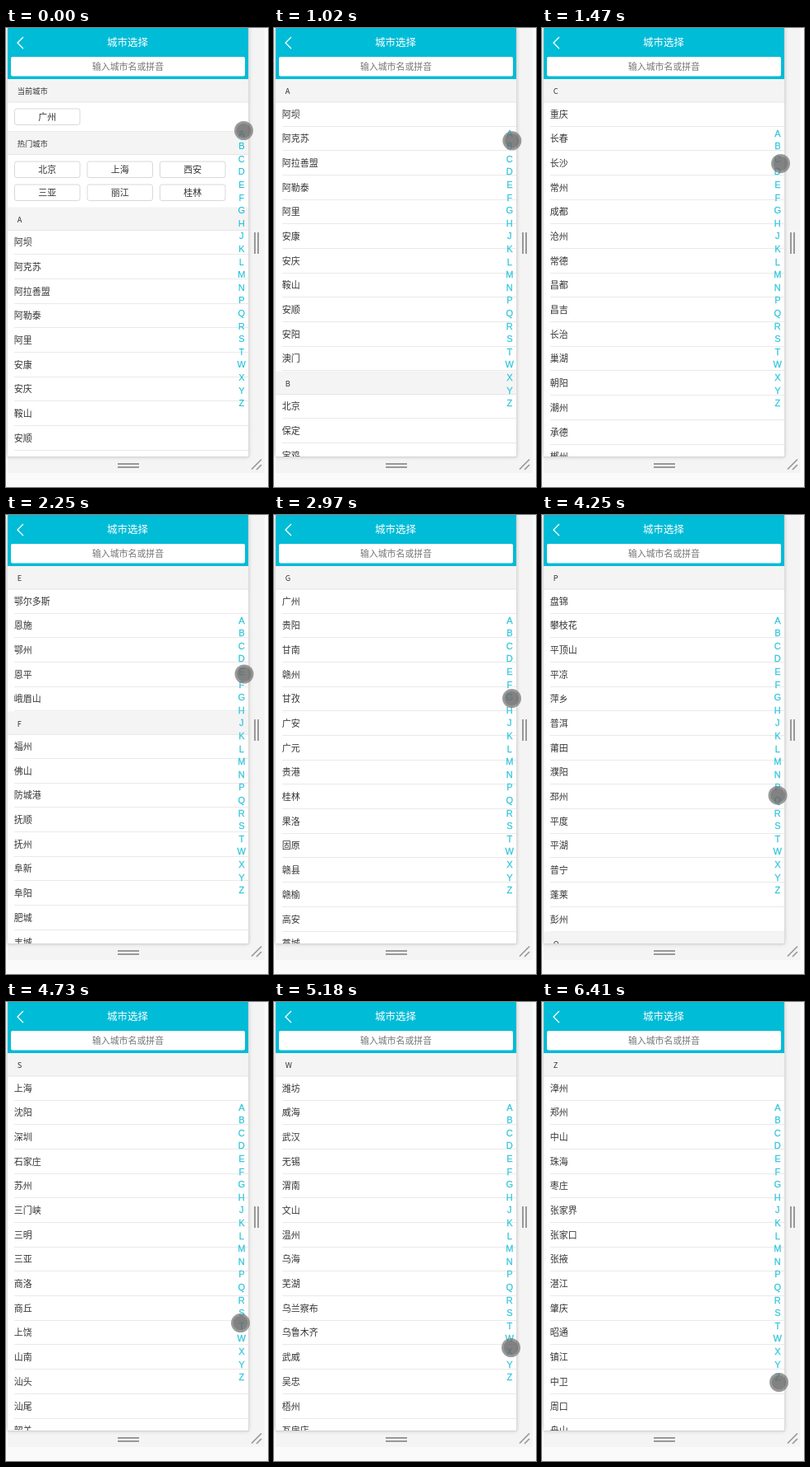
These frames come from a looping animation (319 by 557 pixels, 6730 ms). An HTML page with a canvas:

```html
<!DOCTYPE html>
<html lang="zh-CN">
<head>
<meta charset="utf-8">
<style>
html, body { margin: 0; width: 100%; height: 100%; overflow: hidden; background: #fafafa; }
canvas { display: block; width: 319px; height: 557px; }
</style>
</head>
<body>
<canvas id="stage"></canvas>
<script>
const W = 319, H = 557, LOOP = 6730;
const TEAL = '#00bcd7';
const CJK = '"Noto Sans CJK SC", "Noto Sans CJK", sans-serif';
const LATIN = '"Liberation Sans", Arial, sans-serif';
const LETTERS = [...'ABCDEFGHJKLMNPQRSTWXYZ'];
const TOP = 62, BOTTOM = 520, HEAD_H = 28, ROW_H = 29.68;
const TOUCH_STEP = 15.75;

const CITIES = `阿坝 阿克苏 阿拉善盟 阿勒泰 阿里 安康 安庆 鞍山 安顺 安阳 澳门
北京 保定 宝鸡 包头 蚌埠 白城 百色 白山 白银 保山 巴中 北海 本溪 毕节 滨州 亳州
重庆 长春 长沙 常州 成都 沧州 常德 昌都 昌吉 长治 巢湖 朝阳 潮州 承德 郴州 赤峰
大连 东莞 大理 丹东 大庆 大同 达州 德宏 德阳 德州 定西 迪庆 东营 大丰 大冶 丹阳
鄂尔多斯 恩施 鄂州 恩平 峨眉山
福州 佛山 防城港 抚顺 抚州 阜新 阜阳 肥城 丰城 凤城 奉化 福安 福鼎 福清 富阳
广州 贵阳 甘南 赣州 甘孜 广安 广元 贵港 桂林 果洛 固原 赣县 赣榆 高安 藁城 高密
杭州 哈尔滨 海口 合肥 呼和浩特 惠州 邯郸 汉中 鹤壁 河池 鹤岗 黑河 衡水 衡阳 河源 菏泽
济南 嘉兴 吉林 江门 金华 九江 济宁 佳木斯 吉安 焦作 嘉峪关 揭阳 金昌 晋城 荆门 荆州
昆明 开封 喀什 克拉玛依 克州 垦利 开平 开原 凯里 昆山 库尔勒
兰州 柳州 洛阳 来宾 莱芜 廊坊 拉萨 乐山 凉山 连云港 聊城 辽阳 辽源 丽江 临沧 临汾
绵阳 马鞍山 茂名 眉山 梅州 牡丹江 满洲里 孟州 汨罗 密山 明光
南京 南昌 南宁 南通 宁波 南充 南平 南阳 那曲 内江 宁德 怒江 南安 南康 南雄
盘锦 攀枝花 平顶山 平凉 萍乡 普洱 莆田 濮阳 邳州 平度 平湖 普宁 蓬莱 彭州
青岛 泉州 秦皇岛 黔东南 黔南 黔西南 庆阳 清远 钦州 齐齐哈尔 七台河 曲靖 衢州 迁安 潜江
日喀则 日照 仁怀 任丘 荣成 如东 如皋 乳山 汝州 瑞安 瑞昌 瑞金
上海 沈阳 深圳 石家庄 苏州 三门峡 三明 三亚 商洛 商丘 上饶 山南 汕头 汕尾 韶关 绍兴
天津 太原 泰安 唐山 台州 泰州 塔城 天水 铁岭 通化 通辽 铜川 铜陵 铜仁 吐鲁番 台山
潍坊 威海 武汉 无锡 渭南 文山 温州 乌海 芜湖 乌兰察布 乌鲁木齐 武威 吴忠 梧州 瓦房店 万宁
西安 厦门 徐州 西宁 襄阳 湘潭 湘西 咸宁 咸阳 孝感 锡林郭勒 兴安盟 邢台 新乡 信阳 新余
烟台 扬州 银川 宜昌 延安 盐城 阳江 阳泉 延边 宜宾 伊春 伊犁 营口 鹰潭 益阳 永州
漳州 郑州 中山 珠海 枣庄 张家界 张家口 张掖 湛江 肇庆 昭通 镇江 中卫 周口 舟山 驻马店`
  .split('\n').map(line => line.split(' '));

// [start, end, count]: evenly spaced picture updates
const BURSTS = [
  [0, 0, 1], [70, 70, 1], [860, 1470, 9], [1640, 2250, 9], [2350, 3020, 10],
  [3100, 3720, 9], [3790, 4400, 9], [4480, 5100, 9], [5180, 5790, 9],
  [5870, 5870, 1], [6020, 6180, 3], [6410, 6410, 1]
];

// [time, x, y] of the touch point
const TOUCH = [
  [0, 289.5, 124.5], [70, 289.5, 124], [800, 289.5, 124], [1470, 290.5, 164.5],
  [1640, 290.5, 166], [2250, 290, 193], [2945, 289.5, 222.5], [3020, 289.5, 228],
  [3790, 288.5, 291.5], [4712, 285.5, 389.5], [5180, 288.5, 419.5], [5790, 290.5, 445.5],
  [5870, 290.5, 447.5], [6020, 290, 450], [6180, 288.5, 457.5], [6410, 288.5, 461.5]
];

const canvas = document.getElementById('stage');
const ctx = canvas.getContext('2d');
const ratio = window.devicePixelRatio || 1;
canvas.width = W * ratio;
canvas.height = H * ratio;

function rect(x, y, w, h, color) {
  ctx.fillStyle = color;
  ctx.fillRect(x, y, w, h);
}

function roundBox(x, y, w, h, r, fill, stroke) {
  ctx.beginPath();
  ctx.roundRect(x, y, w, h, r);
  ctx.fillStyle = fill;
  ctx.fill();
  if (stroke) {
    ctx.strokeStyle = stroke;
    ctx.lineWidth = 1;
    ctx.stroke();
  }
}

function line(points, color, width) {
  ctx.beginPath();
  points.forEach(([x, y]) => ctx.lineTo(x, y));
  ctx.strokeStyle = color;
  ctx.lineWidth = width;
  ctx.stroke();
}

function text(str, x, y, size, color, align = 'left', family = CJK, weight = 400) {
  ctx.font = `${weight} ${size}px ${family}`;
  ctx.fillStyle = color;
  ctx.textAlign = align;
  ctx.textBaseline = 'alphabetic';
  ctx.fillText(str, x, y + size * 0.37);
}

function updateTime(t) {
  const [start, end, count] = BURSTS.findLast(b => t >= b[0]);
  if (count === 1) return start;
  const step = (end - start) / (count - 1);
  return start + Math.min(count - 1, Math.floor((t - start) / step + 1e-6)) * step;
}

function touchAt(t) {
  const i = TOUCH.findIndex(k => k[0] > t);
  if (i < 0) return TOUCH.at(-1).slice(1);
  const [t0, x0, y0] = TOUCH[i - 1], [t1, x1, y1] = TOUCH[i];
  const p = (t - t0) / (t1 - t0);
  return [x0 + (x1 - x0) * p, y0 + (y1 - y0) * p];
}

function sectionHead(title, y) {
  rect(2, y, 293, HEAD_H, '#f4f4f4');
  rect(2, y + HEAD_H - 0.5, 293, 1, '#e6e6e6');
  text(title, 13.7, y + 15, 9.3, '#333');
}

function cityButton(name, col, y) {
  const x = 10 + col * 88.5;
  roundBox(x + 0.5, y + 0.5, 79.5, 19.5, 2.5, '#fff', '#d8d8d8');
  text(name, x + 40.2, y + 10.2, 11, '#333', 'center');
}

function drawCities(first, y) {
  for (let s = first; s < CITIES.length && y < BOTTOM; s++) {
    sectionHead(LETTERS[s], y);
    y += HEAD_H;
    for (const city of CITIES[s]) {
      if (y > BOTTOM) return;
      text(city, 9.8, y + 14.6, 11, '#333');
      y += ROW_H;
      rect(10, Math.round(y) - 1, 285, 1, '#e9e9e9');
    }
  }
}

function drawTopSections() {
  sectionHead('当前城市', TOP);
  cityButton('广州', 0, 97.5);
  rect(2, 125, 293, 1, '#e6e6e6');
  sectionHead('热门城市', 125.5);
  ['北京', '上海', '西安', '三亚', '丽江', '桂林'].forEach((name, i) =>
    cityButton(name, i % 3, i < 3 ? 161.5 : 189.5));
  drawCities(0, 217.5);
}

function drawFrame() {
  rect(0, 0, W, H, '#fafafa');
  rect(0, 0, 315, 540, '#f4f4f4');
  rect(0, 0, 2, 540, '#fafafa');
  ctx.save();
  ctx.shadowColor = 'rgba(0,0,0,.25)';
  ctx.shadowBlur = 5 * ratio;
  rect(2, 0, 293, BOTTOM, '#fff');
  ctx.restore();

  const grip = '#999';
  for (const d of [0, 4]) {
    rect(302 + d, 248, 2, 26, grip);
    rect(136, 528 + d, 26, 2, grip);
  }
  line([[299, 535.5], [311, 523.5]], grip, 1.7);
  line([[305, 536], [311, 530]], grip, 1.7);
}

function drawHeader() {
  rect(2, 0, 293, TOP, TEAL);
  line([[21, 11], [14, 18], [21, 25]], '#fff', 1.3);
  text('城市选择', 148, 17.8, 12.5, '#fff', 'center', CJK, 500);
  roundBox(6, 35, 285, 23.5, 2, '#fff');
  text('输入城市名或拼音', 148.5, 47.2, 10.9, '#757575', 'center');
}

function drawIndex(moving) {
  const color = moving ? '#35c7dc' : TEAL;
  LETTERS.forEach((letter, i) => {
    const y = 127.5 + i * 15.6;
    text(letter, 286.8, y, 11, color, 'center', LATIN);
    if (moving) {
      ctx.strokeStyle = color;
      ctx.lineWidth = 0.3;
      ctx.strokeText(letter, 286.8, y + 11 * 0.37);
    }
  });
}

function drawTouch(x, y) {
  const disc = (r, color) => {
    ctx.beginPath();
    ctx.arc(x, y, r, 0, Math.PI * 2);
    ctx.fillStyle = color;
    ctx.fill();
  };
  disc(11.5, 'rgba(115,115,115,.72)');
  disc(8.8, 'rgba(85,85,85,.35)');
}

function render(time) {
  const t = updateTime(time);
  const [x, y] = touchAt(t);
  const moving = t >= 860;
  ctx.setTransform(ratio, 0, 0, ratio, 0, 0);
  drawFrame();
  ctx.save();
  ctx.beginPath();
  ctx.rect(2, TOP, 293, BOTTOM - TOP);
  ctx.clip();
  if (moving) {
    const section = Math.floor((y - 124) / TOUCH_STEP);
    drawCities(Math.max(0, Math.min(LETTERS.length - 1, section)), TOP);
  } else {
    drawTopSections();
  }
  ctx.restore();
  drawHeader();
  rect(295, 0, 1, BOTTOM, '#dcdcdc');
  rect(2, BOTTOM, 294, 1, '#d4d4d4');
  drawIndex(moving);
  drawTouch(x, y);
}

const began = performance.now();
function tick() {
  render((performance.now() - began) % LOOP);
  requestAnimationFrame(tick);
}
tick();
</script>
</body>
</html>
```
